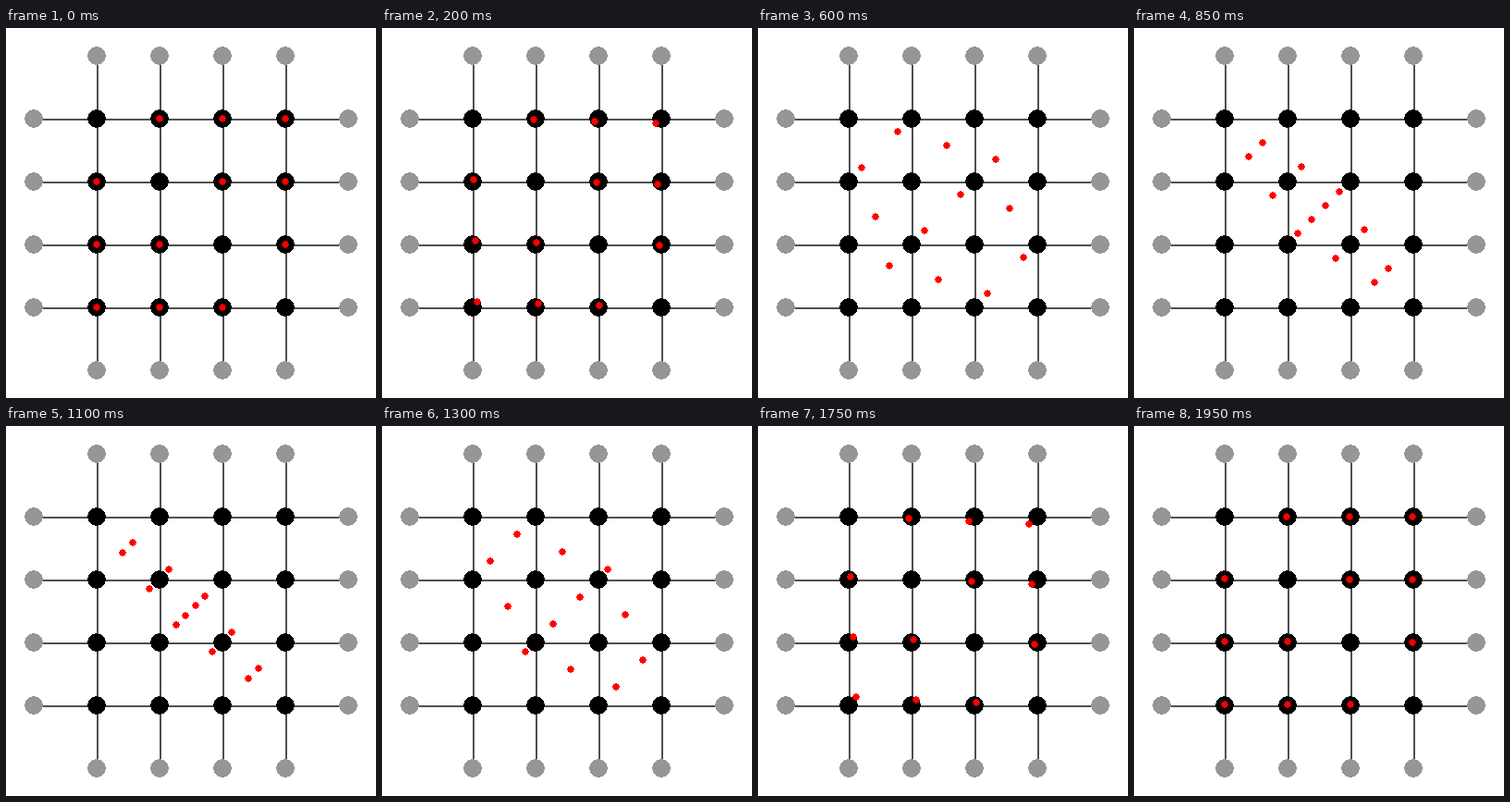
Write an HTML page with a canvas that moves like this. It is 400 px wide and 400 px high and loops after 2000 ms.

```html
<!DOCTYPE html>
<html lang="en">
<head>
<meta charset="utf-8">
<title>Grid transpose</title>
<style>
html, body { margin: 0; width: 100%; height: 100%; overflow: hidden; background: #fff; }
canvas { display: block; }
</style>
</head>
<body>
<canvas id="stage" width="400" height="400"></canvas>
<script>
const ctx = document.getElementById('stage').getContext('2d');
const LOOP = 2000, STEP = 50, SIZE = 4, FIRST = 98, GAP = 68, NEAR = 30, FAR = 370;
const pos = i => FIRST + i * GAP;

// Hard-edged disc, built from whole pixel rows.
function disc(x, y, r, color) {
  ctx.fillStyle = color;
  for (let row = -r; row < r; row++) {
    const half = Math.round(Math.sqrt((r - 0.3) ** 2 - (row + 0.5) ** 2));
    ctx.fillRect(x - half, y + row, 2 * half, 1);
  }
}

function drawGrid() {
  ctx.fillStyle = '#505050';
  for (let i = 0; i < SIZE; i++) {
    ctx.fillRect(NEAR, pos(i), FAR - NEAR, 2);
    ctx.fillRect(pos(i), NEAR, 2, FAR - NEAR);
  }

  for (let i = 0; i < SIZE; i++) {
    for (const end of [NEAR, FAR]) {
      disc(end, pos(i), 10, '#969696');
      disc(pos(i), end, 10, '#969696');
    }
    for (let j = 0; j < SIZE; j++) disc(pos(i), pos(j), 10, '#000');
  }
}

// Each off-diagonal dot travels to its mirrored cell.
function drawDots(progress) {
  const ease = progress * progress * (3 - 2 * progress);
  for (let row = 0; row < SIZE; row++) {
    for (let col = 0; col < SIZE; col++) {
      if (row === col) continue;
      const shift = (row - col) * GAP * ease;
      disc(Math.floor(pos(col) + shift), Math.floor(pos(row) - shift), 4, '#f00');
    }
  }
}

const start = performance.now();
function draw() {
  const time = Math.max(0, performance.now() - start) % LOOP;
  ctx.clearRect(0, 0, 400, 400);
  drawGrid();
  drawDots(Math.floor(time / STEP) * STEP / LOOP);
  requestAnimationFrame(draw);
}
draw();
</script>
</body>
</html>
```
